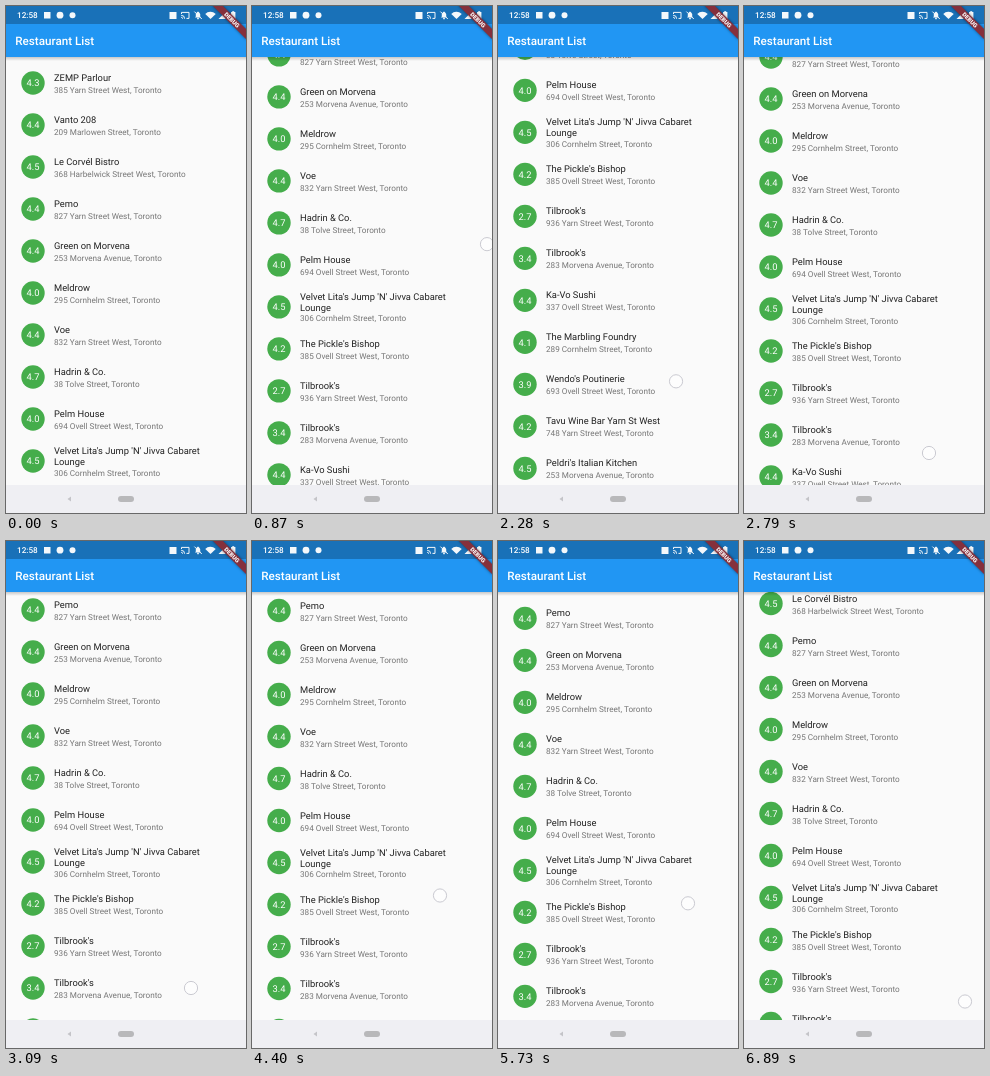
Animation, 240 px wide and 507 px high, one loop 7.19 s. Source, as an HTML page with a canvas:

```html
<!DOCTYPE html>
<html lang="en">
<head>
<meta charset="utf-8">
<title>Restaurant List</title>
<style>
html, body { margin: 0; width: 100%; height: 100%; overflow: hidden; background: #fafafa; }
canvas { display: block; width: 240px; height: 507px; }
</style>
</head>
<body>
<canvas id="stage"></canvas>
<script>
const W = 240, H = 507, LOOP = 7190;
const LIST_TOP = 51, LIST_END = 479, ROW = 42, FIRST = 77;
const FONT = 'Roboto, sans-serif';

const canvas = document.getElementById('stage');
const ctx = canvas.getContext('2d');
const dpr = window.devicePixelRatio || 1;
canvas.width = W * dpr;
canvas.height = H * dpr;
ctx.scale(dpr, dpr);
ctx.textRendering = 'geometricPrecision';

const yarn = n => n + ' Yarn Street West';
const ovell = n => n + ' Ovell Street West';
const morvena = n => n + ' Morvena Avenue';
const cornhelm = n => n + ' Cornhelm Street';

// rating, title (a bar marks a line break), street
const places = [
  ['4.3', 'ZEMP Parlour', yarn(385)],
  ['4.4', 'Vanto 208', '209 Marlowen Street'],
  ['4.5', 'Le Corvél Bistro', '368 Harbelwick Street West'],
  ['4.4', 'Pemo', yarn(827)],
  ['4.4', 'Green on Morvena', morvena(253)],
  ['4.0', 'Meldrow', cornhelm(295)],
  ['4.4', 'Voe', yarn(832)],
  ['4.7', 'Hadrin & Co.', '38 Tolve Street'],
  ['4.0', 'Pelm House', ovell(694)],
  ['4.5', "Velvet Lita's Jump 'N' Jivva Cabaret|Lounge", cornhelm(306)],
  ['4.2', "The Pickle's Bishop", ovell(385)],
  ['2.7', "Tilbrook's", yarn(936)],
  ['3.4', "Tilbrook's", morvena(283)],
  ['4.4', 'Ka-Vo Sushi', ovell(337)],
  ['4.1', 'The Marbling Foundry', cornhelm(289)],
  ['3.9', "Wendo's Poutinerie", ovell(693)],
  ['4.2', 'Tavu Wine Bar Yarn St West', yarn(748)],
  ['4.5', "Peldri's Italian Kitchen", morvena(253)],
  ['4.6', 'Bao Zi Chums', ovell(284)],
  ['3.9', 'Velmo Espresso Bar', ovell(649)]
];

const linear = p => p;
const easeIn = p => p * p;
const easeOut = p => 1 - (1 - p) ** 2;
const smooth = p => p * p * (3 - 2 * p);
const jump = () => 0;
// Friction curve of a released list
const fling = p => p * (3.07 - 3.27 * p + 1.2 * p * p);

// Each key: time, easing towards the next key, values
const scrollKeys = [
  [30, easeIn, 0],
  [870, fling, 153],
  [1600, linear, 423.5],
  [1820, easeIn, 423.5],
  [2280, linear, 329],
  [2500, fling, 257],
  [3110, linear, 133.5],
  [4880, smooth, 133.5],
  [5290, smooth, 177],
  [6020, linear, 98.5]
];
const pointerKeys = [
  [30, easeIn, 236, 392],
  [870, easeOut, 235, 239],
  [950, linear, 235, 205],
  [1200, smooth, 235, 205],
  [1820, easeIn, 201, 280],
  [2280, linear, 178, 375],
  [2500, linear, 185, 447],
  [3110, smooth, 185, 447],
  [3360, linear, 188, 354.5],
  [4880, smooth, 188, 354.5],
  [5290, smooth, 190, 311],
  [6020, linear, 190, 389.5],
  [6270, smooth, 190, 389.5],
  [6590, jump, 193, 460.5],
  [6890, linear, 221, 460.5]
];

function at(keys, t) {
  let i = keys.findIndex(k => k[0] > t);
  if (i < 0) i = keys.length;
  if (i === 0) return keys[0].slice(2);
  const a = keys[i - 1], b = keys[i] || a;
  const p = b === a ? 0 : a[1]((t - a[0]) / (b[0] - a[0]));
  return a.slice(2).map((v, n) => v + (b[n + 2] - v) * p);
}

function box(x, y, w, h, color) {
  ctx.fillStyle = color;
  ctx.fillRect(x, y, w, h);
}

function disc(x, y, r, color) {
  ctx.fillStyle = color;
  ctx.beginPath();
  ctx.arc(x, y, r, 0, 7);
  ctx.fill();
}

function shape(color, ...pts) {
  ctx.fillStyle = color;
  ctx.beginPath();
  pts.forEach(p => ctx.lineTo(p[0], p[1]));
  ctx.fill();
}

function text(str, x, y, size, color, weight = 400, align = 'left') {
  ctx.font = `${weight} ${size}px ${FONT}`;
  ctx.fillStyle = color;
  ctx.textAlign = align;
  ctx.fillText(str, x, y);
}

function drawRow([rating, title, street], y) {
  disc(27, y, 11.7, '#45ad4b');
  text(rating, 27, y + 3.3, 9.33, '#fff', 400, 'center');
  const lines = title.split('|');
  const wrapped = lines.length > 1;
  lines.forEach((line, i) => text(line, 48, y + (wrapped ? -7 : -2) + i * 11, 9.33, '#212121'));
  text(street + ', Toronto', 48, y + (wrapped ? 14.5 : 10), 8.17, '#757575');
}

function drawList(scroll) {
  ctx.save();
  ctx.beginPath();
  ctx.rect(0, LIST_TOP, W, LIST_END - LIST_TOP);
  ctx.clip();
  places.forEach((place, i) => {
    const y = FIRST + i * ROW - scroll;
    if (y > LIST_TOP - 25 && y < LIST_END + 25) drawRow(place, y);
  });
  ctx.restore();
}

function drawStatusIcons() {
  const white = '#f4f8fb';
  box(38, 6, 6.5, 6.5, white);
  disc(54, 9.2, 3.4, white);
  disc(66.5, 9.2, 3, white);
  box(163.5, 6, 7, 7, white);

  // cast
  ctx.strokeStyle = white;
  ctx.lineWidth = 1;
  ctx.beginPath();
  ctx.moveTo(175.5, 8);
  ctx.lineTo(175.5, 6.4);
  ctx.lineTo(183, 6.4);
  ctx.lineTo(183, 12.4);
  ctx.lineTo(180.5, 12.4);
  ctx.stroke();
  for (const r of [1.4, 3.4]) {
    ctx.beginPath();
    ctx.arc(175.2, 12.7, r, -Math.PI / 2, 0);
    ctx.stroke();
  }

  // muted bell
  shape(white, [189, 11.5], [189.8, 10.5], [189.8, 8], [191, 6.2], [192, 5.4],
    [193, 6.2], [194.2, 8], [194.2, 10.5], [195, 11.5]);
  disc(192, 12.4, 0.9, white);
  ctx.beginPath();
  ctx.moveTo(188.4, 5.6);
  ctx.lineTo(195.8, 13);
  ctx.stroke();

  // wifi
  ctx.fillStyle = white;
  ctx.beginPath();
  ctx.moveTo(204.5, 13);
  ctx.arc(204.5, 13, 7.2, -Math.PI * 0.76, -Math.PI * 0.24);
  ctx.fill();

  // signal and battery
  shape(white, [212.5, 13], [219.5, 13], [219.5, 6]);
  box(225, 6, 4.4, 7.2, white);
  box(226.2, 5.2, 2, 1, white);
}

function drawBanner() {
  ctx.save();
  ctx.translate(W, 0);
  ctx.rotate(Math.PI / 4);
  ctx.shadowColor = 'rgba(0,0,0,.5)';
  ctx.shadowBlur = 3 * dpr;
  box(-24, 16.3, 48, 7, '#85303c');
  ctx.shadowColor = 'transparent';
  text('DEBUG', 0, 21.9, 5.95, '#fff', 900, 'center');
  ctx.restore();
}

function drawBars() {
  const shade = ctx.createLinearGradient(0, LIST_TOP, 0, LIST_TOP + 4);
  shade.addColorStop(0, 'rgba(0,0,0,.2)');
  shade.addColorStop(1, 'rgba(0,0,0,0)');
  box(0, LIST_TOP, W, 4, shade);
  box(0, 18, W, LIST_TOP - 18, '#2196f3');
  box(0, 0, W, 18, '#1971b8');
  text('12:58', 11, 12, 8.17, '#fff', 500);
  text('Restaurant List', 9.3, 38.5, 11.67, '#fff', 500);
  drawStatusIcons();
  drawBanner();

  box(0, LIST_END, W, H - LIST_END, '#efeff3');
  shape('#c4c4c8', [61.5, 493], [65, 490.5], [65, 495.5]);
  ctx.fillStyle = '#b8b8ba';
  ctx.beginPath();
  ctx.roundRect(112, 490, 16, 6, 3);
  ctx.fill();
}

function drawPointer(x, y) {
  disc(x, y, 6.6, 'rgba(255,255,255,.55)');
  ctx.strokeStyle = '#c4c4cc';
  ctx.lineWidth = 0.9;
  ctx.beginPath();
  ctx.arc(x, y, 6.6, 0, 7);
  ctx.stroke();
}

function draw(t) {
  box(0, 0, W, H, '#fafafa');
  drawList(at(scrollKeys, t)[0]);
  drawBars();
  if (t >= 30) drawPointer(...at(pointerKeys, t));
}

const start = performance.now();
function tick() {
  draw((performance.now() - start) % LOOP);
  requestAnimationFrame(tick);
}
tick();
</script>
</body>
</html>
```
